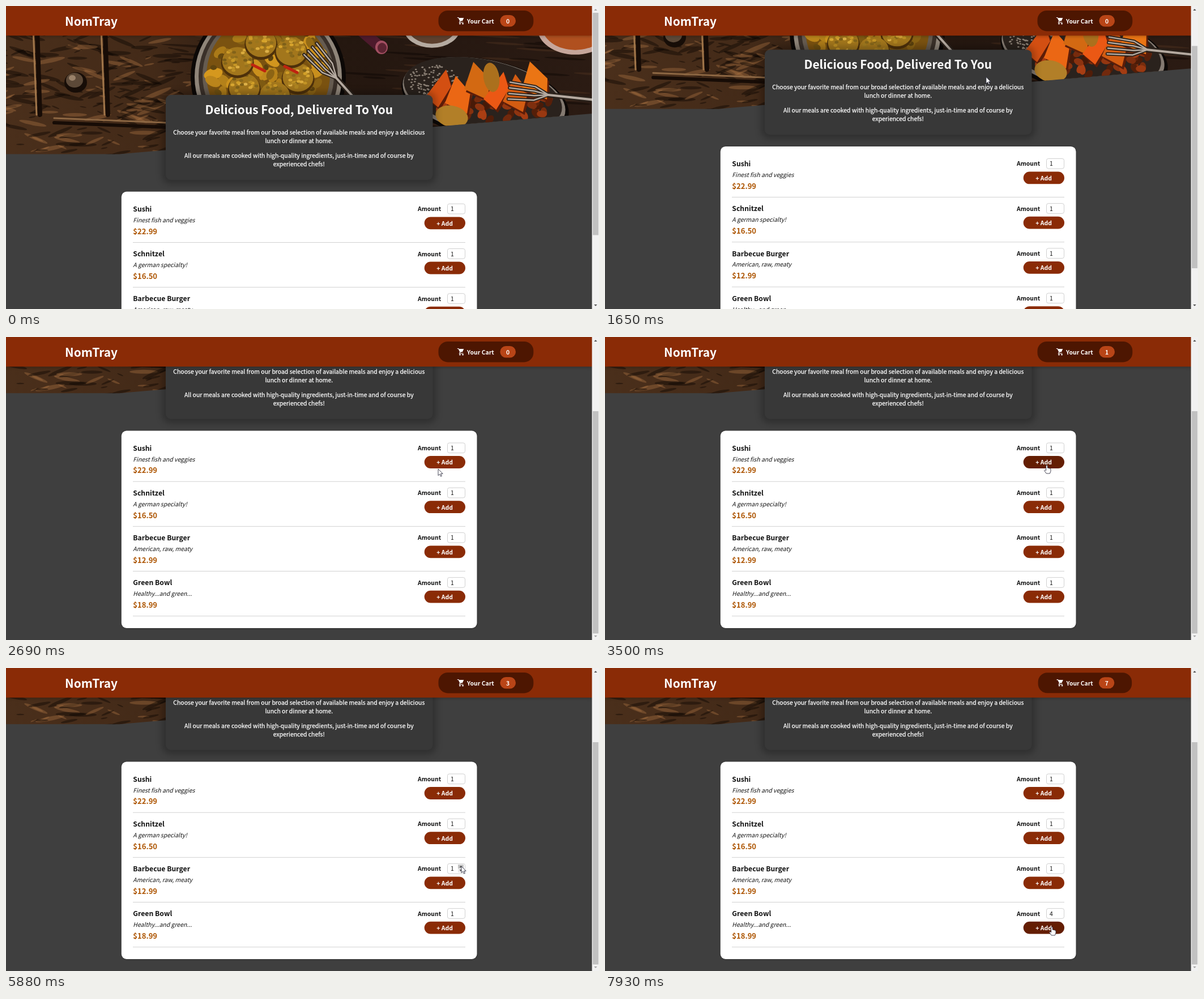
Recreate the animation shown at these times as an HTML page with a canvas. Size 1047 px wide and 535 px high, loop 8 s.

```html
<!DOCTYPE html>
<html lang="en">
<head>
<meta charset="utf-8">
<title>Meal ordering page</title>
<style>
html, body { margin: 0; width: 100%; height: 100%; overflow: hidden; background: #3f3f3f; }
canvas { display: block; }
</style>
</head>
<body>
<canvas id="stage" width="1047" height="535"></canvas>
<script>
const g = document.getElementById('stage').getContext('2d');
const LOOP = 8000, LAST = 7930, BUMP = 300, MAX_SCROLL = 162.3;
const FONT = '"Noto Sans CJK JP", "Noto Sans JP", "Noto Sans CJK SC", sans-serif';
const REM = 10.46, RUST = '#8a2b06', DEEP = '#641e03', INK = '#111';

const meals = [
  ['Sushi', 'Finest fish and veggies', '$22.99'],
  ['Schnitzel', 'A german specialty!', '$16.50'],
  ['Barbecue Burger', 'American, raw, meaty', '$12.99'],
  ['Green Bowl', 'Healthy...and green...', '$18.99']
];
const intro = [
  'Choose your favorite meal from our broad selection of available meals and enjoy a delicious',
  'lunch or dinner at home.',
  'All our meals are cooked with high-quality ingredients, just-in-time and of course by',
  'experienced chefs!'
];
const rowTop = i => 349 + 79.2 * i;

// Pointer moves: start, end, x, y
const start = { x: 740, y: 283 };
const moves = [
  [230, 800, 608, 50], [800, 1400, 665, 111], [1520, 1800, 676, 131], [2380, 2690, 763, 233],
  [2850, 3020, 780, 226], [4320, 4630, 782, 300], [5130, 5500, 784, 374], [5640, 5880, 804, 350],
  [6000, 6420, 816, 440], [6510, 6660, 804, 430], [7380, 7690, 789, 457]
];
const clicks = [3150, 4786, 5570, 7926];

const clamp = (v, lo, hi) => Math.max(lo, Math.min(hi, v));
const progress = (a, b, v) => clamp((v - a) / (b - a), 0, 1);
const smooth = p => p * p * (3 - 2 * p);
const easeOut = p => 1 - (1 - p) ** 2;

const scrollAt = t => MAX_SCROLL * smooth(progress(1374, 1934, t));
const amountAt = t => 1 + clamp(Math.floor((t - 6840) / 150), 0, 3);

function pointerAt(t) {
  let { x, y } = start;
  for (const [a, b, toX, toY] of moves) {
    const p = easeOut(progress(a, b, t));
    x += (toX - x) * p;
    y += (toY - y) * p;
  }
  return [x, y];
}

function bumpScale(p) {
  if (p < 0.1) return 1 - p;
  if (p < 0.5) return 0.9 + 0.25 * easeOut(progress(0.1, 0.5, p));
  return 1.15 - 0.15 * smooth(progress(0.5, 1, p));
}

function box(x, y, w, h, r, fill, stroke) {
  g.beginPath();
  g.roundRect(x, y, w, h, r);
  if (fill) { g.fillStyle = fill; g.fill(); }
  if (stroke) { g.strokeStyle = stroke; g.lineWidth = 0.8; g.stroke(); }
}

// Draws only the shadow; its caster lies off the stage
function shadow(x, y, w, h, r, blur, alpha) {
  g.save();
  g.shadowColor = `rgba(0,0,0,${alpha})`;
  g.shadowBlur = blur;
  g.shadowOffsetX = 3000;
  box(x - 3000, y, w, h, r, '#000');
  g.restore();
}

function text(s, x, y, size, style = '', color = '#fff', align = 'left') {
  g.font = `${style} ${size}px ${FONT}`;
  g.fillStyle = color;
  g.textAlign = align;
  g.fillText(s, x, y);
}

function oval(x, y, rx, ry, fill, tilt = 0) {
  g.beginPath();
  g.ellipse(x, y, rx, ry, tilt, 0, 7);
  g.fillStyle = fill;
  g.fill();
}

function line(points, color, width) {
  g.beginPath();
  points.forEach(p => g.lineTo(...p));
  g.strokeStyle = color;
  g.lineWidth = width;
  g.stroke();
}

function shape(points, fill) {
  g.beginPath();
  points.forEach(p => g.lineTo(...p));
  g.closePath();
  g.fillStyle = fill;
  g.fill();
}

// Points spread over an ellipse, each with its index and a random number
function scatter(n, x, y, rx, ry, seed, paint) {
  const rnd = () => (seed = seed * 16807 % 2147483647) / 2147483647;
  for (let i = 0; i < n; i++) {
    const a = rnd() * 2 * Math.PI, d = Math.sqrt(rnd());
    paint(x + rx * d * Math.cos(a), y + ry * d * Math.sin(a), i, rnd());
  }
}

function wood() {
  const base = g.createLinearGradient(0, 0, 1035, 0);
  ['#4a2f1b', '#432a18', '#24170f', '#261811', '#2b1b13']
    .forEach((c, i) => base.addColorStop(i / 4, c));
  g.fillStyle = base;
  g.fillRect(0, 0, 1035, 262);
  scatter(260, 140, 155, 200, 150, 41, (x, y, i, r) =>
    oval(x, y, 5 + 24 * r, 1 + 3 * r, i % 3 ? 'rgba(14,7,3,.45)' : 'rgba(168,114,66,.4)', (i % 5 - 2) * 0.2));
  scatter(90, 660, 120, 390, 110, 7, (x, y, i, r) =>
    oval(x, y, 20 + 40 * r, 2, i % 2 ? 'rgba(8,4,2,.4)' : 'rgba(110,68,42,.25)', 0.06));
  for (const x of [48, 168]) {
    line([[x, 40], [x + 6, 192]], '#a1764a', 3);
    line([[x + 7, 40], [x + 12, 192]], '#170c06', 8);
  }
  line([[85, 198], [282, 206]], '#8d6743', 3);
  line([[85, 206], [282, 214]], '#170c06', 6);
  oval(123, 135, 20, 18, '#170d07');
  oval(121, 131, 15, 13, '#5c4938');
  oval(117, 127, 6, 5, '#9a826a');
}

function fork(x, y, angle) {
  g.save();
  g.translate(x, y);
  g.rotate(angle);
  for (const [color, width] of [['#2a211a', 6], ['#b5aaa0', 2.5]]) {
    for (let i = -1.5; i < 2; i++) line([[70, i * 10], [25, i * 8], [0, 0]], color, width);
    line([[0, 0], [-80, 0]], color, width * 1.6);
  }
  g.restore();
}

function curry() {
  ['#0c0806', '#8f8579', '#3a3029', '#655b50', '#7a5210']
    .forEach((c, i) => oval(463, 126 - i, 137 - 7 * i, 135 - 7 * i, c));
  scatter(110, 462, 118, 98, 95, 19, (x, y, i, r) =>
    oval(x, y, 5 + 12 * r, 4 + 6 * r, `hsl(40 75% ${20 + 28 * r}%)`, i));
  for (let k = 0; k < 6; k++) {
    const x = 462 + 56 * Math.cos(k * 1.05 + 0.3), y = 112 + 48 * Math.sin(k * 1.05 + 0.3);
    oval(x, y + 3, 29, 27, '#4d300a');
    oval(x, y, 27, 25, '#a2761c');
    scatter(30, x, y - 3, 23, 21, k + 50, (u, v, i, r) =>
      oval(u, v, 3.5, 2.5, `hsl(42 68% ${28 + 30 * r}%)`));
  }
  for (const x of [435, 492]) line([[x, 82 + x / 20], [x + 22, 93 + x / 20]], '#bf2310', 5);
  fork(584, 128, -2.3);
}

function roast() {
  ['#0c0806', '#847a71', '#2a221d'].forEach((c, i) => oval(846 - 2 * i, 165 - 4 * i, 150 - 4 * i, 70 - 4 * i, c, 0.2));
  scatter(120, 755, 132, 45, 28, 5, (x, y) => oval(x, y, 1.8, 1.3, '#8a7f74'));
  scatter(70, 862, 170, 108, 34, 23, (x, y, i, r) =>
    oval(x, y, 9, 6, `hsl(17 80% ${13 + 24 * r}%)`, i));
  for (let i = 0; i < 6; i++) {
    const x = 765 + 34 * i, y = 148 + 14 * Math.sin(i * 2.2), lean = 12 * Math.cos(i * 2);
    const wedge = [[x + lean, y - 36], [x + 21, y - 6], [x + 10 - lean, y + 31], [x - 24, y + 12]];
    shape(wedge.map(([u, v]) => [u + 3, v + 5]), '#5d1d08');
    shape(wedge, `hsl(${19 + i % 3 * 4} 84% ${45 + i % 2 * 5}%)`);
  }
  oval(857, 126, 14, 26, '#ab701d', -0.15);
  oval(787, 195, 29, 19, '#b27f28', 0.2);
  fork(958, 157, 3.25);
}

function heroPhoto() {
  g.save();
  g.beginPath();
  [[0, 0], [1035, 0], [1035, 190], [753, 213.5], [200, 261.5], [0, 261.5]].forEach(p => g.lineTo(...p));
  g.clip();
  g.lineCap = g.lineJoin = 'round';
  wood();
  curry();
  line([[628, 44], [658, 70]], '#4d1a2c', 20);
  oval(663, 73, 11, 12, '#a34f62');
  oval(664, 74, 8, 9, '#5d2432');
  for (const [x, rim, food] of [[752, '#b5aaa0', '#5d402e'], [1005, '#c6a69b', '#b0501f']]) {
    oval(x, 38, x / 15, x / 21, rim);
    oval(x, 34, x / 17, x / 23, food);
  }
  roast();
  g.restore();
}

function summary() {
  shadow(275.5, 151.2, 484, 163, 15, 12, 0.25);
  box(282, 157, 471.5, 150, 9, '#383838');
  text('Delicious Food, Delivered To You', 517.3, 191.3, 2 * REM, 'bold', '#fff', 'center');
  g.strokeStyle = '#fff';
  g.lineWidth = 0.25;
  intro.forEach((s, i) => {
    const y = 226.8 + 15.1 * i + (i > 1 ? 11 : 0);
    text(s, 517.3, y, REM, '', '#fff', 'center');
    g.strokeText(s, 517.3, y);
  });
}

function spinner(y, pointerY) {
  for (const half of [0, 1]) {
    const active = (pointerY > y + 9) === !!half;
    const top = y + 2 + 7 * half, tip = half ? 5 : 2;
    box(798, top, 10, 7, 0, active ? '#c4c4c4' : '#ececec');
    shape([[800.5, top + 7 - tip], [803, top + tip], [805.5, top + 7 - tip]], '#505050');
  }
}

function mealRow([name, about, price], i, amount, target, pointerY) {
  const y = rowTop(i);
  text(name, 224.3, y + 14, 1.17 * REM, 'bold', INK);
  text(about, 224.3, y + 32.9, REM, 'italic', INK);
  text(price, 224.3, y + 53.8, 1.25 * REM, 'bold', '#ad5502');
  g.fillStyle = '#ccc';
  g.fillRect(224, y + 68, 587, 0.9);
  text('Amount', 727, y + 13.3, REM, 'bold', INK);
  box(779.5, y + 0.3, 31, 17.7, 3.3, '#fff', '#c4c4c4');
  text(amount, 785, y + 13.3, REM, '', INK);
  if (target === 'input' + i) spinner(y, pointerY);
  box(738.7, y + 23.4, 72.3, 21.8, 10.9, target === 'button' + i ? DEEP : RUST);
  text('+ Add', 774.6, y + 38.8, REM, 'bold', '#fff', 'center');
}

function cartIcon() {
  line([[796.8, 20.5], [799, 20.5], [802, 26.8], [800.6, 29], [807.5, 29]], '#fff', 1.2);
  shape([[799.3, 21], [808.3, 21], [805.8, 26.6], [801.8, 26.6]], '#fff');
  for (const x of [801.5, 806.6]) oval(x, 31.2, 1.2, 1.2, '#fff');
}

function header(t) {
  shadow(0, 0, 1035, 53, 0, 6, 0.3);
  g.fillStyle = RUST;
  g.fillRect(0, 0, 1035, 52.3);
  text('NomTray', 104, 35, 2 * REM, 'bold');
  const done = clicks.filter(c => c <= t);
  const count = done.length + (done.length === clicks.length ? amountAt(t) - 1 : 0);
  const scale = done.length ? bumpScale(progress(0, BUMP, t - done.at(-1))) : 1;
  g.save();
  g.translate(847.4, 26.2);
  g.scale(scale, scale);
  g.translate(-847.4, -26.2);
  box(763.5, 8, 167.8, 36.4, 16.4, '#4d1601');
  cartIcon();
  text('Your Cart', 814.1, 30.9, REM, 'bold');
  box(872.4, 16, 27.6, 20.5, 10.2, '#b94517');
  text(count, 886.2, 30.9, REM, 'bold', '#fff', 'center');
  g.restore();
}

function scrollbar(scroll) {
  g.fillStyle = '#f1f1f1';
  g.fillRect(1034.6, 0, 13, 535);
  g.fillStyle = '#c1c1c1';
  g.fillRect(1036, 12 + scroll * 0.733, 10, 392.5);
  const shade = on => on ? '#505050' : '#a3a3a3';
  shape([[1038.3, 8], [1041, 5], [1043.7, 8]], shade(scroll > 0));
  shape([[1038.3, 527], [1041, 530], [1043.7, 527]], shade(scroll < MAX_SCROLL));
}

// What lies under the pointer, in page coordinates
function hit(x, y) {
  for (let i = 0; i < meals.length; i++) {
    const d = y - rowTop(i);
    if (x > 739 && x < 811 && d > 23.4 && d < 45.2) return 'button' + i;
    if (x > 779 && x < 811 && d > 0 && d < 18) return 'input' + i;
  }
  const inText = (y > 215 && y < 246) || (y > 256 && y < 287);
  return x > 292 && x < 743 && inText ? 'text' : '';
}

const ARROW = new Path2D('M0 0V11.6L2.7 9.1 4.6 13.2 6.4 12.4 4.6 8.4H8.2Z');
const HAND = new Path2D('M-1.3 1Q0-.8 1.3 1V5L5 5.8 7 7V11L5.4 15H-.8L-4.4 9.8Q-3.6 7.6-1.3 9.6Z');

function cursor(x, y, target) {
  g.save();
  g.translate(x, y);
  if (target === 'text') {
    line([[0, -6], [0, 6]], '#222', 1);
  } else {
    const path = target.startsWith('button') ? HAND : ARROW;
    g.lineJoin = 'round';
    g.fillStyle = '#fff';
    g.fill(path);
    g.strokeStyle = '#1c1c30';
    g.lineWidth = 0.8;
    g.stroke(path);
  }
  g.restore();
}

function draw(now) {
  const t = Math.min(now % LOOP, LAST);
  const scroll = scrollAt(t);
  const [x, y] = pointerAt(t);
  const target = hit(x, y + scroll);

  g.fillStyle = '#3f3f3f';
  g.fillRect(0, 0, 1047, 535);
  g.save();
  g.translate(0, -scroll);
  heroPhoto();
  summary();
  shadow(203.8, 328, 627.7, 349, 9, 3, 0.2);
  box(203.8, 327.8, 627.7, 348.5, 9, '#fff');
  meals.forEach((m, i) => mealRow(m, i, i === 3 ? amountAt(t) : 1, target, y + scroll));
  g.restore();
  header(t);
  scrollbar(scroll);
  if (t >= moves[0][0]) cursor(x, y, target);
}

function tick() {
  draw(performance.now());
  requestAnimationFrame(tick);
}
tick();
</script>
</body>
</html>
```
